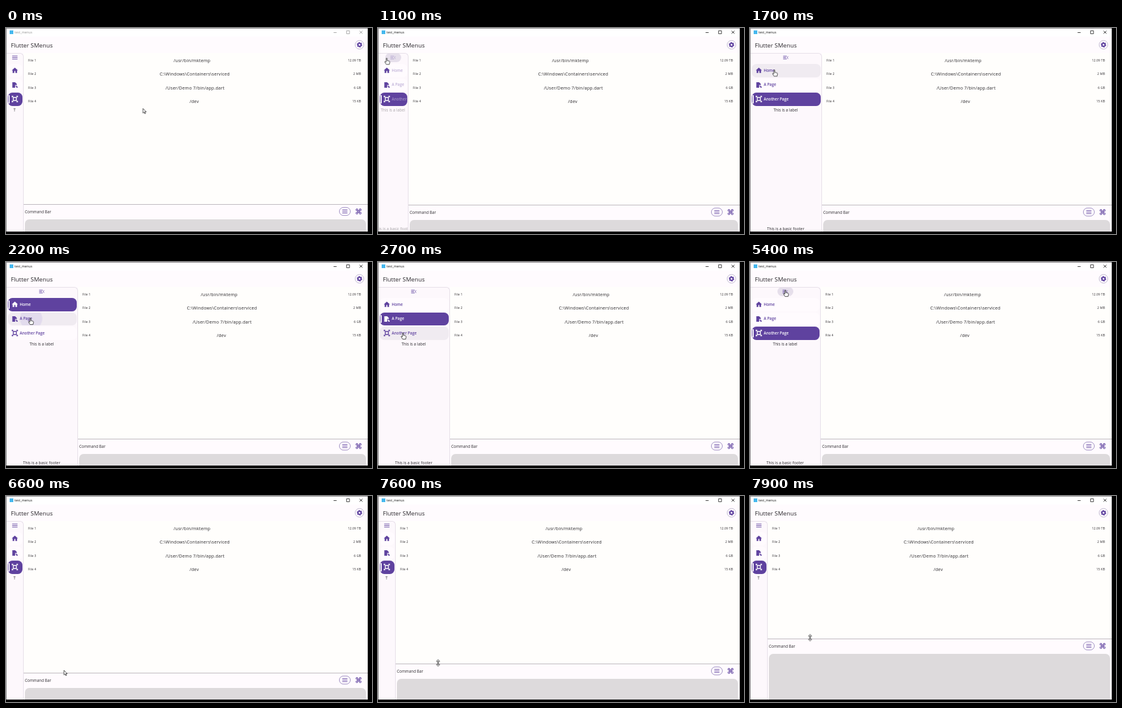
Animation, 600 px wide and 338 px high, one loop 8000 ms. Source, as an HTML page:

```html
<!DOCTYPE html>
<html lang="en">
<head>
<meta charset="utf-8">
<title>Menus demo</title>
<style>
@property --w { syntax: "<number>"; inherits: true; initial-value: 29; }
@property --b { syntax: "<number>"; inherits: true; initial-value: 289.5; }
@property --on { syntax: "<number>"; inherits: true; initial-value: 0; }
@property --hov { syntax: "<number>"; inherits: true; initial-value: 0; }

html, body { margin: 0; width: 100%; height: 100%; overflow: hidden; background: #000; }
#stage {
  --main: #5f429f;
  position: relative; width: 600px; height: 338px; overflow: hidden; background: #000;
  font: 6.3px/10px "Open Sans", "Noto Sans", sans-serif; color: #2a282c; white-space: nowrap;
  animation: width 8s ease-in-out infinite, bar 8s linear infinite;
}
#stage div, #stage svg, #stage span.at { position: absolute; }
svg { fill: none; stroke: currentColor; overflow: visible; }
.solid { fill: currentColor; stroke: none; }

.window { left: 0; top: 0; width: 593px; height: 334px; background: #fffbfe; overflow: hidden; }
.edge { inset: 0; border: solid #8b898c; border-width: 1px 0 0 1px; }
.title { left: 0; top: 0; width: 593px; height: 14px; background: #fff; font-size: 5.4px; animation: active 8s step-end infinite; }
.logo { left: 5.5px; top: 4px; width: 6px; height: 6px; background: #45b8ee; }
.head { left: 8px; top: 21.5px; font-size: 9.75px; line-height: 14px; }
.gear { left: 572px; top: 20.3px; color: var(--main); }

.side {
  left: 0; top: 41px; width: calc(var(--w) * 1px); height: 294px; overflow: hidden; box-sizing: border-box;
  background: #fdf8fc; border: solid #e6dfe8; border-width: 1px 1px 0 0; border-radius: 0 6px 0 0; color: var(--main);
}
.pill { left: calc(50% - 13px); top: -.7px; width: 26px; height: 14.5px; border-radius: 8px; background: #e6dfeb; animation: pill 8s step-end infinite; }
.burger { left: calc(50% - 5.5px); top: 1px; }
.wide { opacity: calc((var(--w) - 40) / 25); }
.slim { opacity: calc((50 - var(--w)) / 10); }
.mid { left: 50%; transform: translateX(-50%); color: #2a282c; letter-spacing: .07px; }

.row {
  left: 3px; right: 1.5px; height: 21.5px; border-radius: 7.5px; overflow: hidden; font-size: 6.25px; font-weight: 600;
  background: color-mix(in srgb, #f0ebf1 calc(var(--hov) * 100%), #fffbfe);
  color: color-mix(in srgb, #fff calc(var(--on) * 100%), var(--main));
  animation: 8s step-end infinite;
}
.row::before { content: ""; position: absolute; inset: 0; background: var(--main); opacity: var(--on); }
.row::after { content: ""; position: absolute; left: 1.3px; top: 4px; width: 1.6px; height: 13.5px; border-radius: 1px; background: #fff; opacity: var(--on); }
.row svg { left: 6px; top: 5.2px; }
.row span { left: 19.5px; top: 5.8px; }
.home { top: 17px; animation-name: home; }
.page { top: 40.5px; animation-name: page; }
.other { top: 64px; animation-name: other; }
.ripple { left: 19.5px; top: -7.5px; width: 36px; height: 36px; border-radius: 50%; background: #e2dbed; animation: ripple 8s linear infinite; }

.main { left: calc(var(--w) * 1px); right: 0; top: 41px; height: 294px; background: #fffefc; }
.file { left: 7.3px; right: 11px; height: 10px; display: flex; justify-content: space-between; font-size: 7.2px; letter-spacing: .2px; }
.file small { font-size: 5.05px; font-weight: 500; letter-spacing: .16px; }
.dock { left: calc(var(--w) * 1px); right: 0; top: calc(var(--b) * 1px - .8px); height: 340px; border-top: 1.6px solid #bcb7bd; background: #fffbfe; }
.dock span { left: 2px; top: 7.4px; letter-spacing: .05px; }
.field { left: 2px; right: 3px; top: 24px; height: 330px; border-radius: 7px; background: #dddadc; }
.list { right: 28.5px; top: 4.4px; color: var(--main); }
.cmd { right: 10.5px; top: 6.4px; color: var(--main); }

.cursor { left: 0; top: 0; animation: move 8s linear infinite; }
.cursor svg { left: 0; top: 0; fill: #fff; stroke: #222; stroke-width: .8; animation: 8s step-end infinite; }
.cursor .arrow { animation-name: arrow; }
.cursor .hand { animation-name: hand; }
.cursor .size { animation-name: size; }

@keyframes width { 0%, 12.5% { --w: 29; } 16.25%, 67.1% { --w: 118; } 71.25%, 100% { --w: 29; } }
@keyframes bar { 0%, 12.49% { --b: 289.5; } 12.5%, 91.25% { --b: 290.8; } 95% { --b: 276; } 98.75%, 100% { --b: 234.8; } }
@keyframes active { 0% { color: #929292; } 11.25%, 100% { color: #111; } }
@keyframes pill { 0% { opacity: 0; } 10.5% { opacity: 1; } 14% { opacity: 0; } 65% { opacity: 1; } 68.5%, 100% { opacity: 0; } }
@keyframes home {
  0% { --on: 0; --hov: 0; } 17% { --on: 0; --hov: 1; } 24.5% { --on: 1; --hov: 0; }
  29% { --on: 0; --hov: 0; } 63.75% { --on: 0; --hov: 1; } 64.75%, 100% { --on: 0; --hov: 0; }
}
@keyframes page {
  0% { --on: 0; --hov: 0; } 25.5% { --on: 0; --hov: 1; } 29% { --on: 1; --hov: 0; }
  35% { --on: 0; --hov: 0; } 62.5% { --on: 0; --hov: 1; } 63.6%, 100% { --on: 0; --hov: 0; }
}
@keyframes other {
  0% { --on: 1; --hov: 0; } 24.5% { --on: 0; --hov: 0; } 31% { --on: 0; --hov: 1; } 35%, 100% { --on: 1; --hov: 0; }
}
@keyframes ripple {
  0%, 26.2% { transform: scale(0); } 27.5% { transform: scale(1); } 29% { transform: scale(3); opacity: 1; }
  29.01%, 100% { transform: scale(3); opacity: 0; }
}
@keyframes move {
  0%, 3% { transform: translate(224.5px, 132px); animation-timing-function: ease-in-out; }
  10.6%, 13.5% { transform: translate(14px, 49px); animation-timing-function: ease-in-out; }
  18%, 24.5% { transform: translate(40px, 68.5px); }
  26.2%, 29% { transform: translate(40px, 92px); }
  32%, 35% { transform: translate(41px, 116px); animation-timing-function: ease-in-out; }
  43%, 46% { transform: translate(59.5px, 207.5px); animation-timing-function: ease-in-out; }
  51% { transform: translate(70px, 321px); animation-timing-function: ease-in; }
  56.25% { transform: translate(62px, 250px); }
  65%, 68.75% { transform: translate(58px, 46px); animation-timing-function: ease-in-out; }
  78.75% { transform: translate(94.5px, 281px); }
  82.5%, 85% { transform: translate(95px, 286px); }
  88%, 91.25% { transform: translate(98.5px, 288.5px); }
  95% { transform: translate(98.5px, 274px); }
  98.75%, 100% { transform: translate(98.5px, 232.5px); }
}
@keyframes arrow { 0% { opacity: 1; } 10.4% { opacity: 0; } 14% { opacity: 1; } 16.5% { opacity: 0; } 36.5% { opacity: 1; } 61.5% { opacity: 0; } 70% { opacity: 1; } 86.5%, 100% { opacity: 0; } }
@keyframes hand { 0% { opacity: 0; } 10.4% { opacity: 1; } 14% { opacity: 0; } 16.5% { opacity: 1; } 36.5% { opacity: 0; } 61.5% { opacity: 1; } 70%, 100% { opacity: 0; } }
@keyframes size { 0% { opacity: 0; } 86.5%, 100% { opacity: 1; } }
</style>
</head>
<body>
<div id="stage">
  <div class="window">
    <div class="title">
      <div class="logo"></div>
      <span class="at" style="left:14px;top:2px">test_menus</span>
      <svg width="593" height="14" stroke-width=".8"><path d="M537 7.5h5M558.3 4.6h4.8v4.8h-4.8zM579.6 4.6l4.8 4.8m0-4.8l-4.8 4.8"/></svg>
    </div>
    <div class="head">Flutter SMenus</div>
    <svg class="gear" width="15" height="15" viewBox="-7.5 -7.5 15 15">
      <circle r="7.1" stroke="#a79cbc" stroke-width=".7"/>
      <circle r="2.6" stroke-width="2"/><circle r="3.7" stroke-width="1.4" stroke-dasharray="1.94 1.935"/>
    </svg>

    <div class="main">
      <div class="file" style="top:6.5px"><small>File 1</small><span>/usr/bin/mktemp</span><small>12.09 TB</small></div>
      <div class="file" style="top:29px"><small>File 2</small><span>C:\Windows\Containers\serviced</span><small>2 MB</small></div>
      <div class="file" style="top:51.5px"><small>File 3</small><span>/User/Demo 7/bin/app.dart</span><small>6 GB</small></div>
      <div class="file" style="top:74px"><small>File 4</small><span>/dev</span><small>15 KB</small></div>
    </div>

    <div class="dock">
      <span class="at">Command Bar</span>
      <svg class="list" width="19" height="14" viewBox="-9.5 -7 19 14">
        <rect x="-9" y="-6.6" width="18" height="13.2" rx="6.6" stroke="#8571b2" stroke-width=".8"/>
        <path d="M-4.200-2.600h8.400M-4.200 0h8.400M-4.200 2.600h8.400" stroke-width=".9"/>
      </svg>
      <svg class="cmd" width="10" height="10" viewBox="0 0 24 24" stroke-width="2.6">
        <path d="M9 9h6v6H9zM9 9H5.500A3.500 3.500 0 1 1 9 5.500zM15 9V5.500A3.500 3.500 0 1 1 18.500 9zM15 15h3.500A3.500 3.500 0 1 1 15 18.500zM9 15v3.500A3.500 3.500 0 1 1 5.500 15z"/>
      </svg>
      <div class="field"></div>
    </div>

    <div class="side">
      <div class="pill"></div>
      <svg class="burger slim" width="11" height="11" viewBox="0 0 24 24" stroke-width="2"><path d="M2.500 6.500h19M2.500 12h19M2.500 17.500h19"/></svg>
      <svg class="burger wide" width="11" height="11" viewBox="0 0 24 24" stroke-width="2"><path d="M3 7h13M3 12h10M3 17h13M21 8l-4 4 4 4"/></svg>
      <div class="row home">
        <svg class="solid" width="11" height="11" viewBox="0 0 24 24"><path d="M10 21v-7h4v7h6v-9h3L12 2 1 12h3v9z"/></svg>
        <span class="at wide">Home</span>
      </div>
      <div class="row page">
        <div class="ripple"></div>
        <svg class="solid" width="11" height="11" viewBox="0 0 24 24"><path d="M3 2h10l6 6v4h-6v10H3zM15 14h3v3h4v5h-3l-4-4z"/></svg>
        <span class="at wide">A Page</span>
      </div>
      <div class="row other">
        <svg width="11" height="11" viewBox="0 0 24 24"><path d="M6.500 6.500h11v11h-11z" stroke-width="3"/><path d="M1 3h5M18 3h5M1 21h5M18 21h5" stroke-width="4.500"/></svg>
        <span class="at wide">Another Page</span>
      </div>
      <div class="mid wide" style="top:87.500px">This is a label</div>
      <div class="mid slim" style="top:87.500px">T</div>
      <div class="mid wide" style="top:282.500px">This is a basic footer</div>
    </div>
    <div class="edge"></div>
  </div>

  <div class="cursor">
    <svg class="arrow" width="8" height="10"><path d="M0 0v7.600l1.800-1.600 1.300 2.800 1.200-.6-1.300-2.700h2.400z"/></svg>
    <svg class="hand" width="8" height="12"><path d="M-.8.700q.8-1.200 1.600 0v3.600l3.600.9q1 .4.700 1.800l-.7 3.600H-.6L-3 6.700q-.2-1.300 1-.9l1.200 1z"/></svg>
    <svg class="size" width="6" height="12"><path d="M0-5.500l2.600 2.900H.7v5.200h1.900L0 5.500l-2.600-2.900h1.900v-5.200h-1.900z"/></svg>
  </div>
</div>
</body>
</html>
```
